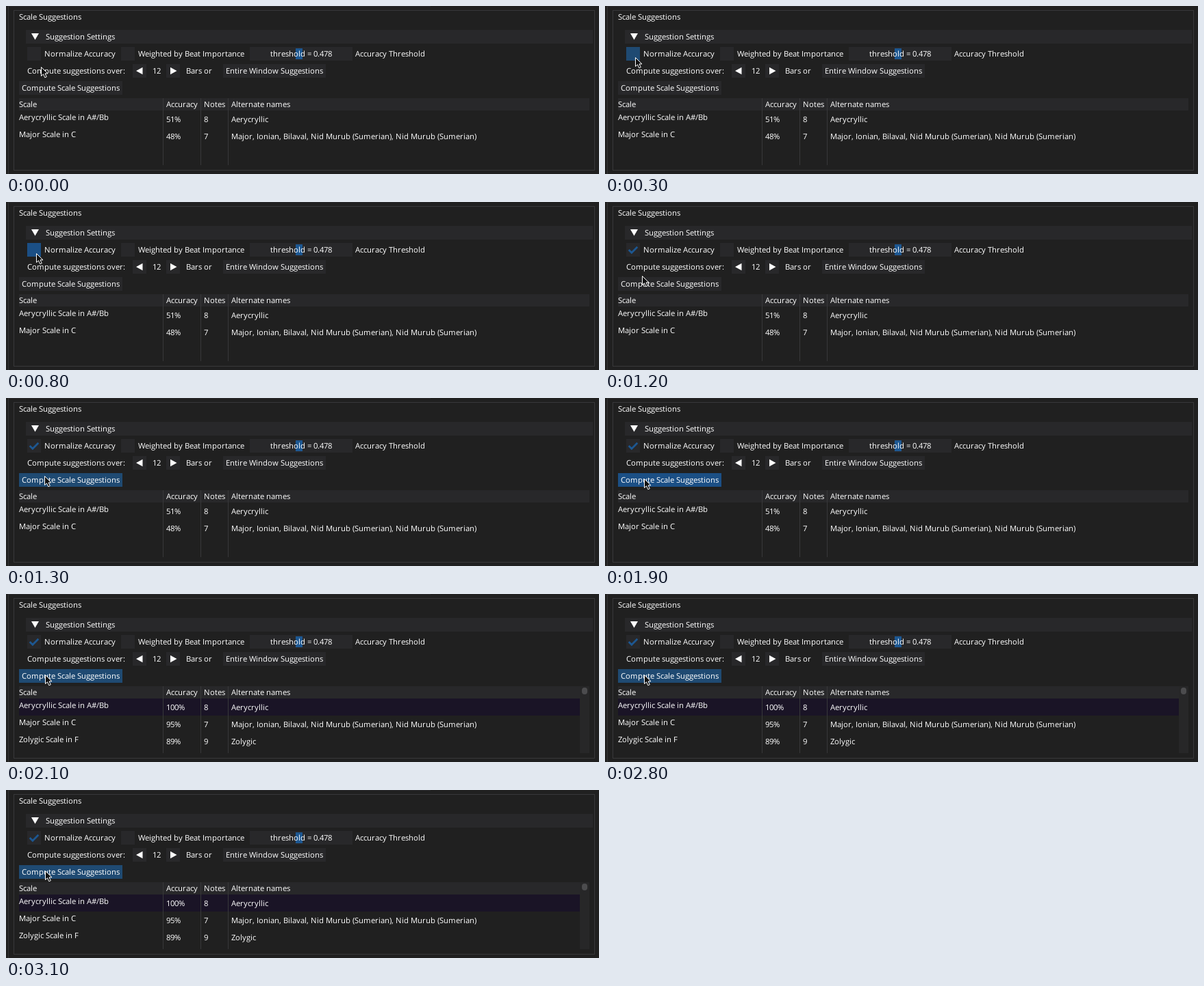
Recreate the animation shown at these times as an HTML page with a canvas. Size 866 by 246 pixels, loop 3.4 s.

```html
<!DOCTYPE html>
<html lang="en">
<head>
<meta charset="utf-8">
<title>Scale Suggestions</title>
<style>
html, body { margin: 0; width: 100%; height: 100%; overflow: hidden; background: #202020; }
canvas { display: block; }
</style>
</head>
<body>
<canvas id="stage" width="866" height="246"></canvas>
<script>
const ctx = document.getElementById('stage').getContext('2d');
const LOOP = 3400, STEP = 100;
const FRAME = '#28282a', LINE = '#38383a', HOVER = '#1f4a72', ACTIVE = '#1b4f85', MARK = '#1d5791';

// Pointer tip: [start ms, x, y]
const path = [
  [0, 51, 89], [100, 50, 86], [200, 46, 79], [300, 44, 75],
  [1100, 49, 91], [1200, 54, 108], [1300, 56, 114], [1400, 57, 117],
  [1500, 58, 119], [1600, 57, 118]
];

const rows = [
  ['Aerycryllic Scale in A#/Bb', '51%', '100%', '8', 'Aerycryllic'],
  ['Major Scale in C', '48%', '95%', '7', 'Major, Ionian, Bilaval, Nid Murub (Sumerian), Nid Murub (Sumerian)'],
  ['Zolygic Scale in F', '', '89%', '9', 'Zolygic']
];

function rect(x, y, w, h, color = FRAME) {
  ctx.fillStyle = color;
  ctx.fillRect(x, y, w, h);
}

// Glyph advances snap to whole pixels, as in the GUI toolkit
const advances = {};
function text(str, x, y) {
  ctx.fillStyle = '#fff';
  for (const ch of str) {
    ctx.fillText(ch, x, y);
    x += advances[ch] ??= Math.round(ctx.measureText(ch).width);
  }
}

function shape(points, fill, stroke, close = true) {
  ctx.beginPath();
  points.forEach(([x, y]) => ctx.lineTo(x, y));
  if (close) ctx.closePath();
  if (fill) { ctx.fillStyle = fill; ctx.fill(); }
  if (stroke) { ctx.strokeStyle = stroke; ctx.stroke(); }
}

function drawPanel() {
  rect(0, 0, 866, 246, '#202020');
  rect(3, 0, 1, 246, '#333335');
  rect(3, 0, 617, 1, '#2b2b2d');
  ctx.lineWidth = 1;
  ctx.strokeStyle = LINE;
  ctx.strokeRect(11.5, 6.5, 848, 234);
  text('Scale Suggestions', 19, 20);
  rect(29, 35, 828, 20);
  shape([[37, 40], [48, 40], [42.5, 49.5]], '#fff');
  text('Suggestion Settings', 58, 49);
}

function drawSettings(boxColor, checked) {
  rect(31, 60, 20, 20, boxColor);
  if (checked) {
    ctx.lineWidth = 2.8;
    shape([[34.7, 70], [38.9, 74.2], [47.3, 65.8]], null, MARK, false);
  }
  text('Normalize Accuracy', 56, 74);
  rect(168, 60, 20, 20);
  text('Weighted by Beat Importance', 193, 74);
  rect(356, 60, 150, 20);
  rect(423, 62, 10, 16, MARK);
  text('threshold = 0.478', 386, 74);
  text('Accuracy Threshold', 510, 74);

  text('Compute suggestions over:', 31, 99);
  rect(185, 85, 20, 20);
  shape([[190, 95], [199.5, 89.8], [199.5, 100.2]], '#fff');
  text('12', 214, 99);
  rect(234, 85, 20, 20);
  shape([[249.5, 95], [240, 89.8], [240, 100.2]], '#fff');
  text('Bars or', 263, 99);
  rect(317, 85, 150, 20);
  text('Entire Window Suggestions', 321, 99);
}

function drawTable(updated) {
  const right = updated ? 838 : 852;
  rect(19, 135, right - 19, 18);
  if (updated) {
    rect(19, 153, right - 19, 25, '#1a1426');
    rect(838, 135, 14, 98, '#272728');
    ctx.fillStyle = '#4c4c4e';
    ctx.beginPath();
    ctx.roundRect(841, 137, 8, 10, 4);
    ctx.fill();
  }
  [229, 284, 324].forEach(x => rect(x, 135, 1, 98, LINE));
  ['Scale', 'Accuracy', 'Notes', 'Alternate names'].forEach((s, i) => text(s, [19, 234, 289, 329][i], 148));
  rows.slice(0, updated ? 3 : 2).forEach(([name, before, after, notes, other], i) => {
    const y = 170 + i * 25;
    text(name, 19, y - 3);
    text(updated ? after : before, 234, y);
    text(notes, 289, y);
    text(other, 329, y);
  });
}

function drawPointer(x, y) {
  ctx.save();
  ctx.translate(x + .5, y + .5);
  ctx.lineWidth = 1;
  shape([[0, 0], [0, 13], [3, 10.3], [5.3, 15.3], [7.8, 14.2], [5.5, 9.4], [9.5, 9.4]], '#111', '#fff');
  ctx.restore();
}

function draw(now) {
  const t = Math.floor(now % LOOP / STEP) * STEP;
  const [, x, y] = path.findLast(p => p[0] <= t);
  const boxPressed = t >= 700 && t < 900;
  const buttonPressed = t >= 1800 && t < 2000;
  const tint = (hovered, pressed) => pressed ? ACTIVE : hovered ? HOVER : FRAME;

  ctx.font = '11.32px "Open Sans", "Noto Sans", sans-serif';
  ctx.textRendering = 'geometricPrecision';
  drawPanel();
  drawSettings(tint(y < 80, boxPressed), t >= 900);
  rect(19, 110, 151, 20, tint(y >= 110, buttonPressed));
  text('Compute Scale Suggestions', 23, 124);
  drawTable(t >= 2000);
  drawPointer(x, y);
}

const start = performance.now();
function tick() {
  draw(performance.now() - start);
  requestAnimationFrame(tick);
}
tick();
</script>
</body>
</html>
```
